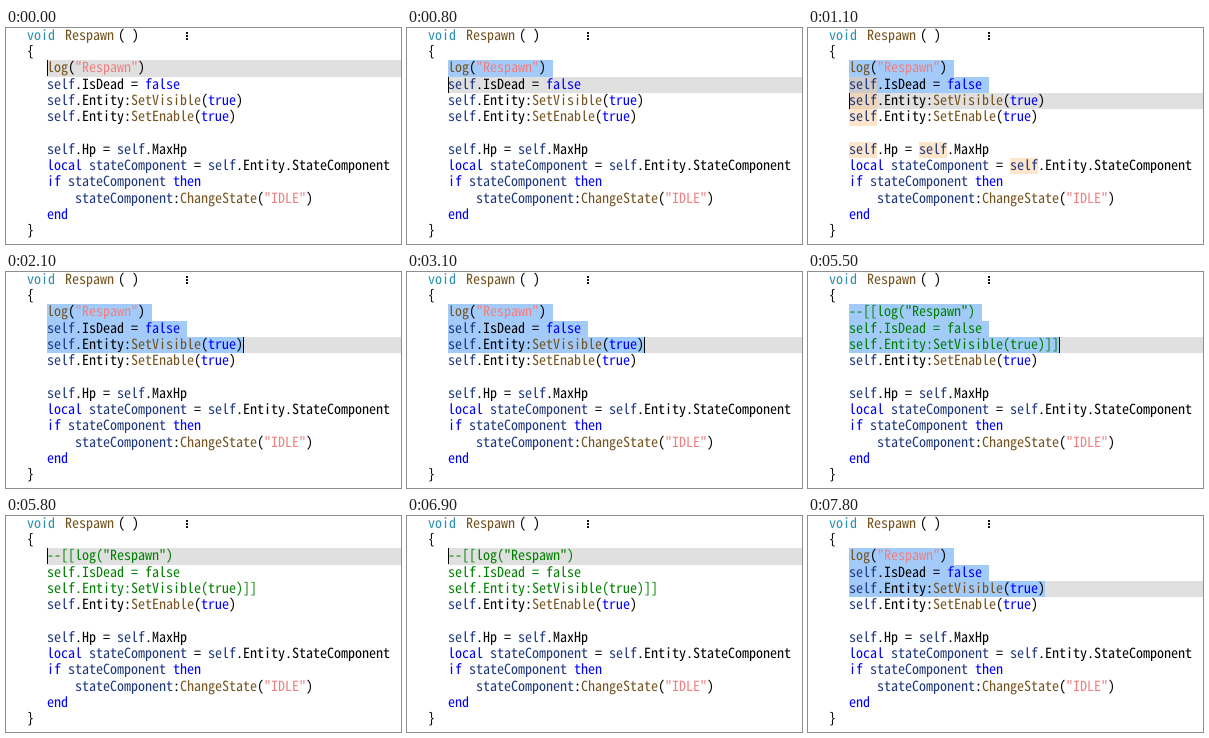
Recreate the animation shown at these times as an HTML page. Size 395 by 216 pixels, loop 8 s.

```html
<!DOCTYPE html>
<html lang="en">
<head>
<meta charset="utf-8">
<title>Block comment</title>
<style>
html, body { margin: 0; width: 100%; height: 100%; overflow: hidden; background: #fff; }
svg { display: block; width: 395px; height: 216px; }
text {
  font: 14px "Noto Sans Mono CJK KR", "Noto Sans Mono CJK JP", "Noto Sans Mono CJK SC", "Noto Sans Mono CJK", monospace;
  white-space: pre; text-rendering: geometricPrecision;
}
</style>
</head>
<body>
<svg viewBox="0 0 395 216">
  <rect width="395" height="216" fill="#fff"/>
  <g id="back"></g>
  <g id="code"></g>
  <g id="front"></g>
</svg>
<script>
const LOOP = 8000, LEFT = 41, CH = 7, TOP = 32.3, PITCH = 16.3, BASELINE = 12;
const COLOR = {
  plain: '#000', name: '#1f377f', key: '#0000ff', call: '#74531f',
  string: '#f08080', comment: '#008000', type: '#2b91af',
  bar: '#e0e0e0', select: '#a3cbfa', word: 'rgba(255,200,140,.45)'
};
const KEYWORDS = /^(local|if|then|end|true|false)$/;
const BODY = [
  'log("Respawn")',
  'self.IsDead = false',
  'self.Entity:SetVisible(true)',
  'self.Entity:SetEnable(true)',
  '',
  'self.Hp = self.MaxHp',
  'local stateComponent = self.Entity.StateComponent',
  'if stateComponent then',
  '    stateComponent:ChangeState("IDLE")',
  'end'
];
const COMMENTED = BODY.slice();
COMMENTED[0] = '--[[' + BODY[0];
COMMENTED[2] = BODY[2] + ']]';

// start time, caret row, caret column, then the parts that are shown
const STEPS = [
  [0, 0, 0, 'caret'],
  [800, 1, 0, 'caret select'],
  [1100, 2, 0, 'caret select words'],
  [1600, 2, 28, 'caret select words'],
  [2100, 2, 28, 'caret select'],
  [2600, 2, 28, 'select'],
  [3100, 2, 28, 'caret select'],
  [3700, 2, 28, 'select'],
  [4100, 2, 28, 'caret select'],
  [4400, 2, 30, 'caret select comment'],
  [4900, 2, 30, 'select comment'],
  [5500, 2, 30, 'caret select comment'],
  [5800, 0, 0, 'caret comment'],
  [6300, 0, 0, 'comment'],
  [6900, 0, 0, 'caret comment'],
  [7200, 2, 28, 'caret select'],
  [7800, 2, 28, 'select']
];

const layer = id => document.getElementById(id);
const back = layer('back'), code = layer('code'), front = layer('front');
const rowY = row => Math.round(TOP + PITCH * row);
const colX = col => LEFT + CH * col;

function add(parent, tag, attrs, content) {
  const el = document.createElementNS('http://www.w3.org/2000/svg', tag);
  for (const k in attrs) el.setAttribute(k, attrs[k]);
  if (content !== undefined) el.textContent = content;
  parent.append(el);
  return el;
}

function box(row, from, to, fill) {
  const y = rowY(row);
  add(back, 'rect', { x: from, y, width: to - from, height: rowY(row + 1) - y, fill });
}

function write(parent, x, row, content, fill) {
  add(parent, 'text', { x, y: TOP + PITCH * row + BASELINE, fill }, content);
}

function tokenColor(token, before, after) {
  if (token[0] === '"') return COLOR.string;
  if (KEYWORDS.test(token)) return COLOR.key;
  if (after === '(') return COLOR.call;
  return /\w/.test(token) && before !== '.' ? COLOR.name : COLOR.plain;
}

function writeLine(line, row, commented) {
  if (commented) return write(code, LEFT, row, line, COLOR.comment);
  for (const m of line.matchAll(/"[^"]*"|\w+|[^\w\s"]+/g)) {
    const [token] = m, i = m.index;
    write(code, colX(i), row, token, tokenColor(token, line[i - 1], line[i + token.length]));
  }
}

function draw([, row, col, parts]) {
  const has = part => parts.includes(part);
  const lines = has('comment') ? COMMENTED : BODY;
  for (const g of [back, code, front]) g.replaceChildren();

  box(row, LEFT, 395, COLOR.bar);
  if (has('select')) {
    for (let r = 0; r < row; r++) box(r, LEFT, colX(lines[r].length + 1), COLOR.select);
    if (col) box(row, LEFT, colX(col), COLOR.select);
  }
  if (has('words')) {
    lines.forEach((line, r) => {
      for (const m of line.matchAll(/self/g)) box(r, colX(m.index), colX(m.index + 4), COLOR.word);
    });
  }
  lines.forEach((line, r) => writeLine(line, r, has('comment') && r < 3));
  if (has('caret')) add(front, 'rect', { x: colX(col), y: rowY(row), width: 1, height: 16, fill: '#000' });
}

function drawFrame() {
  const g = add(document.querySelector('svg'), 'g', {});
  write(g, 21, -2, 'void', COLOR.type);
  write(g, 59, -2, 'Respawn', COLOR.call);
  write(g, 112, -2, '(', COLOR.plain);
  write(g, 126, -2, ')', COLOR.plain);
  write(g, 21, -1, '{', COLOR.plain);
  write(g, 21, 10, '}', COLOR.plain);
  for (const y of [4, 7, 10]) add(g, 'rect', { x: 180, y, width: 2, height: 2, fill: '#111' });
}

let shown;
function tick() {
  const t = performance.now() % LOOP;
  const step = STEPS.findLast(s => s[0] <= t);
  if (step !== shown) draw(shown = step);
  requestAnimationFrame(tick);
}

drawFrame();
tick();
</script>
</body>
</html>
```
